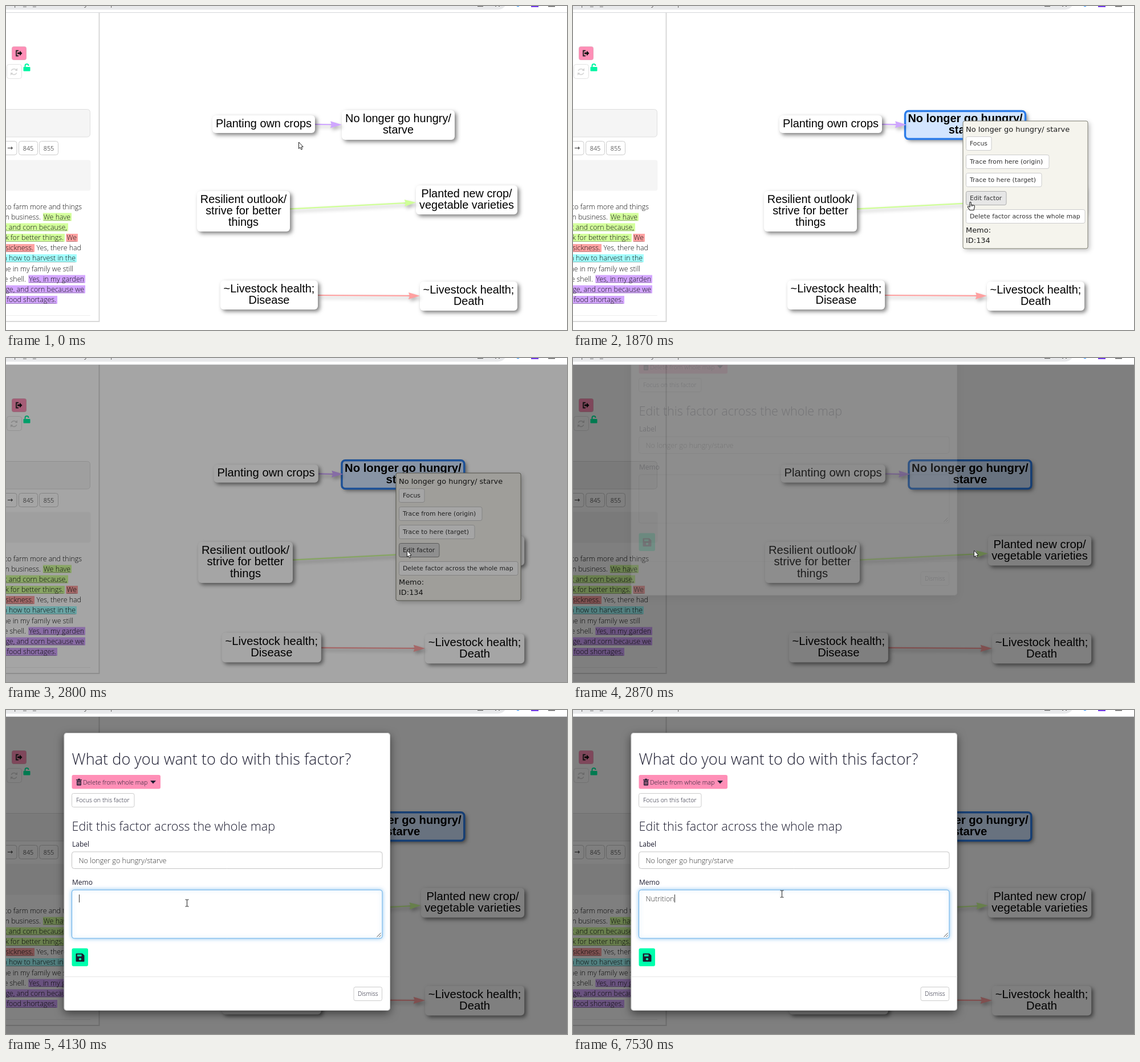
Write an HTML page with a canvas that moves like this. It is 984x569 px and loops after 8000 ms.

```html
<!DOCTYPE html>
<html lang="en">
<head>
<meta charset="utf-8">
<title>Edit a factor</title>
<style>
html, body { margin: 0; width: 100%; height: 100%; overflow: hidden; background: #fff; }
canvas { display: block; }
</style>
</head>
<body>
<canvas id="stage" width="984" height="569"></canvas>
<script>
const W = 984, H = 569, LOOP = 8000;
const stage = document.getElementById('stage').getContext('2d');
const layer = document.createElement('canvas');
layer.width = W;
layer.height = H;
const modalCtx = layer.getContext('2d');
let g = stage;

const UI = '"Open Sans", "Noto Sans", sans-serif';
const MAP = '"Liberation Sans", Arial, sans-serif';
const TIP = '"DejaVu Sans", Verdana, sans-serif';
const light = size => `300 ${size}px ${UI}`;
const clamp = v => Math.max(0, Math.min(1, v));

function text(str, x, y, font, color, align = 'left') {
  g.font = font;
  g.fillStyle = color;
  g.textAlign = align;
  g.fillText(str, x, y);
}

function box(x, y, w, h, r, fill, stroke, lw = 1) {
  g.beginPath();
  g.roundRect(x, y, w, h, r);
  if (fill) { g.fillStyle = fill; g.fill(); }
  if (stroke) { g.strokeStyle = stroke; g.lineWidth = lw; g.stroke(); }
}

function poly(points, fill, stroke, lw = 1, open = false) {
  g.beginPath();
  points.forEach(([x, y], i) => i ? g.lineTo(x, y) : g.moveTo(x, y));
  if (!open) g.closePath();
  if (fill) { g.fillStyle = fill; g.fill(); }
  if (stroke) { g.strokeStyle = stroke; g.lineWidth = lw; g.stroke(); }
}

function shadow(color, blur, dx, dy) {
  g.shadowColor = color;
  g.shadowBlur = blur;
  g.shadowOffsetX = dx;
  g.shadowOffsetY = dy;
}
const noShadow = () => shadow('transparent', 0, 0, 0);

// Sidebar: each line is a baseline followed by [text, right edge, highlight]
const GREEN = '#d3ff9c', RED = '#ffa3a3', CYAN = '#a3ffff', PURPLE = '#d3a6ff';
const LINES = [
  [356.5, ['want to farm more and things', 133]],
  [374.5, ['own business.', 61], ['We have', 113, GREEN]],
  [392.5, ['wheat and corn because,', 107, GREEN]],
  [411, ['outlook for better things.', 101, GREEN], ['We', 124, RED]],
  [429, ['of sickness.', 48, RED], ['Yes, there had', 132]],
  [447, ['learn how to harvest in the', 122, CYAN]],
  [465.5, ['one in my family we still', 118]],
  [483.5, ['the shell.', 35], ['Yes, in my garden', 137, PURPLE]],
  [501.5, ['cabbage, and corn because we', 137, PURPLE]],
  [520, ['of food shortages.', 88, PURPLE]]
];

function sidebar() {
  g.fillStyle = '#d9d9d9';
  g.fillRect(162.5, 11, 2, 544);
  g.fillRect(0, 553, 164, 2);

  box(10.5, 71.5, 25, 23, 3, '#ff8fb7', '#e8a3ba');
  poly([[22, 78.5], [18, 78.5], [18, 87.5], [22, 87.5]], null, '#222', 1.8, true);
  poly([[20, 81.5], [24, 81.5], [24, 78.5], [28.5, 83], [24, 87.5], [24, 84.5], [20, 84.5]], '#111');

  box(1.5, 102.5, 26, 25, 4, '#fff', '#e2e2e2');
  g.strokeStyle = '#d3d3d3';
  g.lineWidth = 1.5;
  for (const a of [0.35, Math.PI + 0.35]) {
    g.beginPath();
    g.arc(14, 115.5, 5, a, a + 2.3);
    g.stroke();
  }
  poly([[20, 109], [20, 114], [15.5, 113.5]], '#d3d3d3');
  poly([[8, 122], [8, 117], [12.5, 117.5]], '#d3d3d3');

  box(30.5, 107, 12, 7.5, 1, '#00f5a2');
  g.beginPath();
  g.moveTo(33.5, 107);
  g.lineTo(33.5, 105);
  g.arc(36.5, 105, 3, Math.PI, 0);
  g.strokeStyle = '#00f5a2';
  g.lineWidth = 2;
  g.stroke();

  box(-20, 181.5, 167.5, 48.5, 5, '#f5f5f5', '#dedede');
  for (const [x, w, label] of [[-14, 33, '→'], [22.5, 33, '845'], [58.5, 33, '855']]) {
    box(x, 237.5, w, 24, 4, '#fff', '#ccc');
    if (label === '→') text(label, 7, 253, `12px ${TIP}`, '#333', 'center');
    else text(label, x + w / 2, 253.5, light(10.8), '#111', 'center');
  }
  box(-20, 270.5, 168.5, 54, 4, '#f5f5f5');

  for (const [y, ...parts] of LINES) {
    for (const [str, right, mark] of parts) {
      g.font = light(12.4);
      const w = g.measureText(str).width;
      if (mark) {
        g.fillStyle = mark;
        g.fillRect(right - w - 1, y - 11, w + 3, 14);
        g.fillStyle = 'rgba(40,40,40,.35)';
        g.fillRect(right - w, Math.round(y + 1.5), w, 1);
      }
      text(str, right, y, light(12.4), '#111', 'right');
    }
  }
  g.fillStyle = '#eee';
  g.fillRect(0, 543, 148, 1);
}

// Map nodes: x, y, width, height, lines
const NODES = [
  [362, 192, 180, 31, 'Planting own crops'],
  [589, 183, 198, 52, 'No longer go hungry/', 'starve'],
  [335, 325, 163, 71, 'Resilient outlook/', 'strive for better', 'things'],
  [719, 315, 178, 51, 'Planted new crop/', 'vegetable varieties'],
  [376, 482, 171, 51, '~Livestock health;', 'Disease'],
  [726, 484, 171, 51, '~Livestock health;', 'Death']
];

// The line lies below the nodes, its head above them
function edge([x1, y1, x2, y2, color], head) {
  const len = Math.hypot(x2 - x1, y2 - y1);
  g.save();
  g.translate(x2, y2);
  g.rotate(Math.atan2(y2 - y1, x2 - x1));
  shadow('rgba(0,0,0,.3)', 6, 3, 4);
  if (head) {
    poly([[0, 0], [-20, 6], [-18, 0], [-20, -6]], color);
  } else {
    g.fillStyle = color;
    g.fillRect(-len, -1.1, len - 17, 2.2);
  }
  g.restore();
}

function node([x, y, w, h, ...lines], selected) {
  if (selected) { x -= 6.5; y += 1.5; w += 13; h -= 3; }
  shadow('rgba(0,0,0,.5)', 7, 3.5, 3.5);
  box(x, y, w, h, 6, selected ? '#d2e5ff' : '#fff');
  noShadow();
  if (selected) box(x, y, w, h, 6, null, '#2b7ce9', 3.4);
  const top = y + h / 2 + 5.3 - (lines.length - 1) * 10;
  lines.forEach((s, i) =>
    text(s, x + w / 2, top + i * 20, `${selected ? 'bold ' : ''}19.9px ${MAP}`, '#000', 'center'));
}

function map(selected, zoomed) {
  const edges = [
    [542, 207.8, selected ? 585 : 589, 208.5, '#cfa6ff'],
    [498, 356.3, 719, 345.1, '#cfff97'],
    [547, 508, 726, 509, '#ffa0a0']
  ];
  g.save();
  if (zoomed) {
    g.translate(222, 454);
    g.scale(1.018, 1.018);
    g.translate(-222, -454);
  }
  edges.forEach(e => edge(e, false));
  NODES.forEach((n, i) => node(n, selected && i === 1));
  edges.forEach(e => edge(e, true));
  g.restore();
}

const BUTTONS = [
  [229, 45, 'Focus'],
  [261, 146, 'Trace from here (origin)'],
  [293, 133, 'Trace to here (target)'],
  [325, 71, 'Edit factor'],
  [357, 209, 'Delete factor across the whole map']
];
const over = ([y, w], c) => c.x >= 689 && c.x <= 689 + w && c.y >= y && c.y <= y + 25;

function popup(c, pressed) {
  shadow('rgba(0,0,0,.25)', 9, 3, 3);
  box(684, 202, 219, 224, 3, '#f5f4ed');
  noShadow();
  box(684, 202, 219, 224, 3, null, '#808074');
  text('No longer go hungry/ starve', 689, 220.5, `12.95px ${TIP}`, '#1d1d1d');
  for (const b of BUTTONS) {
    const [y, w, label] = b, hot = over(b, c);
    const fill = !hot ? '#fff' : pressed ? '#dcdcdc' : '#e6e6e6';
    box(689.5, y + 0.5, w - 0.5, 24, 3, fill, !hot ? '#ccc' : pressed ? '#8c8c8c' : '#adadad');
    text(label, 696, y + 16, `10.87px ${TIP}`, '#333');
  }
  text('Memo:', 689, 398, `12.95px ${TIP}`, '#1d1d1d');
  text('ID:134', 689, 416, `12.95px ${TIP}`, '#1d1d1d');
}

const KEYS = [5270, 5530, 5870, 6400, 6800, 7000, 7270, 7400, 7530];

function modal(t) {
  const ink = '#1c1c30';
  g.clearRect(0, 0, W, H);
  shadow('rgba(0,0,0,.5)', 15, 0, 5);
  box(101.5, 40, 572.5, 488, 5, '#fff');
  noShadow();
  box(102, 40.5, 571.5, 487, 5, null, 'rgba(0,0,0,.2)');
  text('What do you want to do with this factor?', 115.5, 96, light(27.15), ink);

  box(115.5, 114, 155.5, 24.5, 3, '#ff8fb7');
  g.fillStyle = ink;
  g.fillRect(123, 122, 10, 1.4);
  g.fillRect(126, 120.7, 4, 1.4);
  box(124, 124, 8, 8.5, 1, ink);
  g.fillStyle = '#ff8fb7';
  for (const x of [125.6, 127.6, 129.6]) g.fillRect(x, 125.3, 0.9, 5.7);
  text('Delete from whole map', 135, 130.5, light(10.8), ink);
  poly([[253, 124], [263, 124], [258, 129.5]], ink);

  box(115.5, 146.5, 109.5, 24, 3, '#fff', '#ccc');
  text('Focus on this factor', 123, 162, light(10.65), ink);
  text('Edit this factor across the whole map', 115.5, 212, light(21.55), ink);

  text('Label', 116, 240, `12px ${UI}`, ink);
  box(115.5, 249, 544.5, 29.5, 4, '#fff', '#c4c4c4');
  text('No longer go hungry/starve', 127.5, 268.7, light(12.55), '#333');

  text('Memo', 116, 306.5, `12px ${UI}`, ink);
  const focus = t >= 4000;
  if (focus) shadow('rgba(102,175,233,.7)', 7, 0, 0);
  box(115.5, 316, 544.5, 85, 4, '#fff', focus ? '#66afe9' : '#c4c4c4');
  noShadow();
  poly([[650.5, 398.5], [657.5, 391.5]], null, '#555', 1, true);
  poly([[654.5, 398.5], [657.5, 395.5]], null, '#555', 1, true);
  const typed = 'Nutrition'.slice(0, KEYS.filter(k => t >= k).length);
  text(typed, 127.5, 335.5, light(12.55), '#333');
  if (focus && (t < 4600 || t >= 5130)) {
    g.fillStyle = '#333';
    g.fillRect(Math.round(128 + g.measureText(typed).width), 324, 1, 14);
  }

  box(115.5, 418.5, 28.5, 31.5, 3, '#00ffad');
  poly([[123, 428], [134, 428], [137, 431], [137, 441.5], [123, 441.5]], ink, ink, 1);
  g.fillStyle = '#00ffad';
  g.fillRect(125, 429.5, 7.5, 3.2);
  g.beginPath();
  g.arc(130, 437.5, 2.1, 0, 7);
  g.fill();

  g.fillStyle = '#e5e5e5';
  g.fillRect(102, 468, 572, 1);
  box(610, 486.5, 49.5, 24, 3, '#fff', '#ccc');
  text('Dismiss', 634.8, 502, light(10.4), ink, 'center');
}

function browserBar() {
  g.fillStyle = '#fff';
  g.fillRect(0, 0, W, 11);
  box(-30, -24, 908, 30.5, 15, '#e8e9eb');
  for (const [s, x] of [['p', 14], ['_', 30], ['_', 47], ['y', 137], ['p', 183]])
    text(s, x, -0.5, `13px ${UI}`, '#666');
  g.fillStyle = '#666';
  g.fillRect(827, 0, 10, 1.2);
  g.fillRect(858, 0, 2, 1);
  g.fillRect(864, 0, 2, 1);
  g.fillRect(951, 0, 12, 1.5);
  g.fillStyle = '#4aa3ff';
  g.fillRect(896, 0, 4, 1.2);
  g.fillStyle = '#7038e8';
  g.fillRect(921, 0, 13, 2);
  g.fillStyle = '#d5d7da';
  g.fillRect(0, 11, W, 1);
}

// Pointer path: time, x, y
const PATH = [
  [0, 513, 239], [70, 513, 239], [530, 676, 194], [800, 676, 194], [870, 684, 202],
  [1200, 684, 202], [1800, 697, 344], [2070, 697, 344], [2330, 703, 338],
  [3030, 703, 338], [3470, 404, 327], [3800, 317, 339], [4140, 317, 339],
  [4260, 345, 426], [4400, 366, 323], [LOOP, 366, 323]
];

function pointer(t) {
  const i = PATH.findIndex(k => k[0] > t);
  const [t0, x0, y0] = PATH[i - 1], [t1, x1, y1] = PATH[i];
  const p = (t - t0) / (t1 - t0), e = p * p * (3 - 2 * p);
  return { x: x0 + (x1 - x0) * e, y: y0 + (y1 - y0) * e };
}

function arrow() {
  poly([[0.5, 0], [0.5, 11.5], [3, 9.2], [4.8, 13.2], [6.7, 12.3], [5, 8.6], [8.2, 8.3]], '#fff', '#222');
}

function hand() {
  g.beginPath();
  g.moveTo(-1.2, 8);
  g.lineTo(-1.2, 1.2);
  g.quadraticCurveTo(0, -0.8, 1.2, 1.2);
  g.lineTo(1.2, 5);
  g.lineTo(6.2, 6);
  g.quadraticCurveTo(7.6, 6.4, 7.4, 8.5);
  g.lineTo(6, 14.5);
  g.lineTo(-1, 14.5);
  g.lineTo(-4.8, 9);
  g.quadraticCurveTo(-4, 6.6, -1.2, 9);
  g.closePath();
  g.fillStyle = '#fff';
  g.fill();
  g.strokeStyle = '#222';
  g.lineWidth = 1.1;
  g.stroke();
  for (const x of [1.2, 3.7]) poly([[x, 5.5], [x, 8]], null, '#222', 1, true);
}

function beam() {
  g.fillStyle = '#222';
  g.fillRect(0, -6, 1, 12);
  for (const y of [-6.5, 5.5]) {
    g.fillRect(-2.5, y, 2.5, 1);
    g.fillRect(1, y, 2.5, 1);
  }
}

function draw(t) {
  const c = pointer(t);
  const tip = t >= 670 && t < 2850;
  g = stage;
  noShadow();
  g.fillStyle = '#fff';
  g.fillRect(0, 0, W, H);
  sidebar();
  map(t >= 870, t >= 2670);
  if (tip) popup(c, t >= 2530);

  g.fillStyle = `rgba(0,0,0,${0.5 * clamp((t - 2695) / 150)})`;
  g.fillRect(0, 0, W, H);

  const shown = clamp((t - 2853) / 165);
  if (shown) {
    g = modalCtx;
    modal(t);
    g = stage;
    const above = 122 * (1 - clamp((t - 2853) / 325)) ** 1.62;
    g.globalAlpha = shown;
    g.drawImage(layer, 0, -Math.round(above));
    g.globalAlpha = 1;
  }
  browserBar();

  const inMemo = t > 3100 && c.x > 116 && c.x < 660 && c.y > 316 && c.y < 401;
  const onButton = tip && t < 2670 && BUTTONS.some(b => over(b, c));
  g.save();
  g.translate(Math.round(c.x), Math.round(c.y));
  if (inMemo) beam();
  else if (onButton) hand();
  else arrow();
  g.restore();
}

const start = performance.now();
function tick() {
  draw((performance.now() - start) % LOOP);
  requestAnimationFrame(tick);
}
tick();
</script>
</body>
</html>
```
